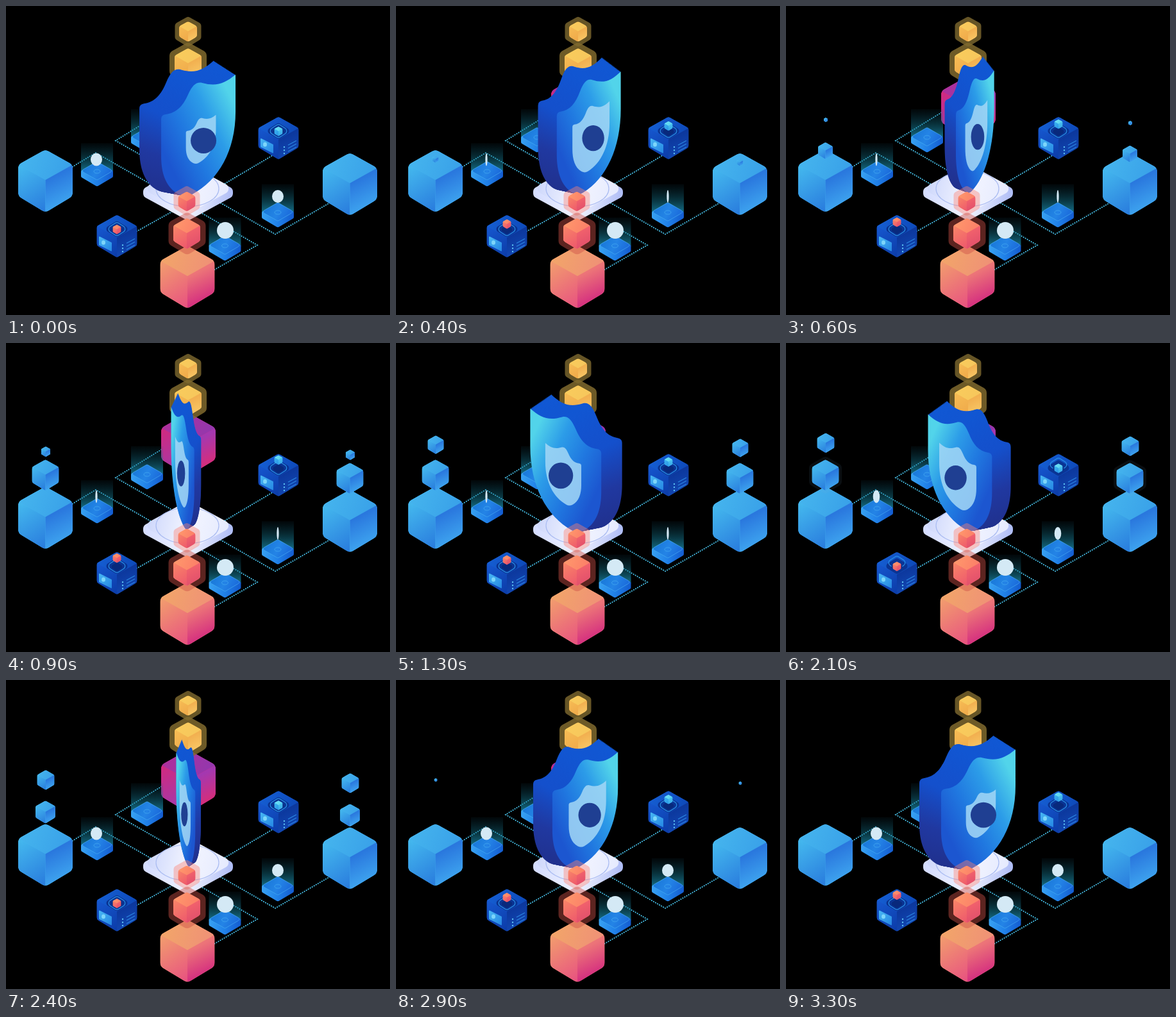
Recreate the animation shown at these times as an HTML page with a canvas. Size 599x482 px, loop 3400 ms.

```html
<!DOCTYPE html>
<html lang="en">
<head>
<meta charset="utf-8">
<title>Isometric shield</title>
<style>
html, body { margin: 0; width: 100%; height: 100%; overflow: hidden; background: #000; }
canvas { display: block; }
</style>
</head>
<body>
<canvas id="stage" width="599" height="482"></canvas>
<script>
const g = document.getElementById('stage').getContext('2d');
const LOOP = 3400, STEP = 100;
const { PI, sin, cos, abs, min, max, floor } = Math;

// Gradient pairs for the top, left and right side of a cube
const BLUE = [['#46b6ee', '#389fe8'], ['#44b8ee', '#2a7ede'], ['#2a78de', '#3fa6f0']];
const PINK = [['#f2a768', '#ef8f78'], ['#f29c6e', '#e8557f'], ['#ec7478', '#d32a80']];
const CORAL = [['#ff9a6c', '#fb7c68'], ['#f98468', '#ee5a6c'], ['#f0606c', '#e2506c']];
const PURPLE = [['#b0309a', '#9038b0'], ['#d02a80', '#9c3cb0'], ['#a438b0', '#dc2c74']];
const GOLD = [['#f9cc5c', '#f6c65c'], ['#f6bc54', '#efa94a'], ['#f2b050', '#f8c866']];
const CYAN = [['#6fe4f4', '#58d0f0'], ['#3cb4f0', '#2c98e8'], ['#48c0ee', '#36a8ea']];

// Progress from a to b as 0..1, and a half wave between them
const seg = (t, a, b) => max(0, min(1, (t - a) / (b - a)));
const bump = (t, a, b) => sin(PI * seg(t, a, b));

function ramp(x0, y0, x1, y1, ...colors) {
  const r = g.createLinearGradient(x0, y0, x1, y1);
  colors.forEach((c, i) => r.addColorStop(i / (colors.length - 1), c));
  return r;
}

// Closed polygon with rounded corners
function poly(pts, r = 0) {
  const n = pts.length, [ax, ay] = pts[n - 1], [bx, by] = pts[0];
  g.beginPath();
  g.moveTo((ax + bx) / 2, (ay + by) / 2);
  pts.forEach((p, i) => g.arcTo(...p, ...pts[(i + 1) % n], r));
  g.closePath();
}

function fillPoly(pts, color, r) {
  poly(pts, r);
  g.fillStyle = color;
  g.fill();
}

const hexagon = (x, y, w, tall = .58) => {
  const upper = y - (tall - .28) * w, lower = y + (tall - .3) * w;
  return [[x, y - tall * w], [x + w / 2, upper], [x + w / 2, lower],
    [x, y + tall * w], [x - w / 2, lower], [x - w / 2, upper]];
};

const rhombus = (x, y, w, h) => [[x, y - h], [x + w, y], [x, y + h], [x - w, y]];

// Rhombus with its lower edges pulled down by d
const slab = (x, y, w, h, d) =>
  [[x, y - h], [x + w, y], [x + w, y + d], [x, y + h + d], [x - w, y + d], [x - w, y]];

function cube(x, y, w, colors, round = .13, tall = .58) {
  if (w < 1) return;
  const outline = hexagon(x, y, w, tall), [top, ur, lr, bottom, ll, ul] = outline;
  const mid = [x, y - (tall - .56) * w], h = w / 2;
  g.save();
  poly(outline, w * round);
  g.clip();
  fillPoly(outline, colors[1][0]);
  fillPoly([top, ur, mid, ul], ramp(x - h, y - h, x + h, y - .2 * h, ...colors[0]));
  fillPoly([ul, mid, bottom, ll], ramp(x - h, y - .5 * h, x, y + h, ...colors[1]));
  fillPoly([mid, ur, lr, bottom], ramp(x, y, x + .5 * h, y + h, ...colors[2]));
  g.restore();
}

function halo(x, y, w, color) {
  fillPoly(hexagon(x, y, w), color, w * .15);
}

function disc(x, y, rx, ry, color) {
  g.beginPath();
  g.ellipse(x, y, rx, ry, 0, 0, 7);
  g.fillStyle = color;
  g.fill();
}

function ring(x, y, rx, ry, color) {
  g.beginPath();
  g.ellipse(x, y, rx, ry, 0, 0, 7);
  g.strokeStyle = color;
  g.stroke();
}

function line(...pts) {
  g.beginPath();
  pts.forEach(p => g.lineTo(...p));
  g.stroke();
}

function wires() {
  g.save();
  g.strokeStyle = '#48c2ea';
  g.lineWidth = 1.8;
  g.setLineDash([1.9, 1.6]);
  line([100, 253], [140, 229], [240, 286]);
  line([246, 164], [171, 210], [262, 262]);
  line([203, 352], [264, 318]);
  line([338, 279], [416, 233]);
  line([310, 293], [420, 356], [505, 307]);
  line([300, 320], [392, 373], [324, 412]);
  g.restore();
}

// Glowing tile with its light beam; y is the middle of the top face
function pod(x, y) {
  g.fillStyle = ramp(0, y - 43, 0, y + 2, 'rgba(16,90,115,.08)', 'rgba(20,120,145,.4)', 'rgba(28,150,185,.75)');
  g.fillRect(x - 25, y - 43, 50, 45);
  fillPoly(slab(x, y, 25, 14.5, 10), ramp(x - 25, 0, x + 25, 0, '#38a2f2', '#2080e8', '#145cd0'), 3);
  fillPoly(rhombus(x, y, 25, 14.5), ramp(x - 20, y - 10, x + 20, y + 10, '#1878d8', '#2484e6', '#1a68da'), 2.5);
  g.lineWidth = 1;
  poly(rhombus(x, y, 25, 14.5), 2.5);
  g.strokeStyle = 'rgba(80,185,245,.55)';
  g.stroke();
  ring(x, y + 1, 5, 3, 'rgba(80,185,245,.55)');
}

function server(x, y, colors, t) {
  const lift = 13 * bump(t % 2450, 0, 1800), frameLift = 9 * bump(t, 1300, 2300);
  cube(x, y, 63, [['#1660d4', '#0d48b8'], ['#1658d0', '#0c3ca8'], ['#0c379c', '#1248b4']], .09, .53);
  fillPoly(rhombus(x, y - 11, 21, 13), '#0a3494', 5);
  g.lineWidth = 1.2;
  g.strokeStyle = '#2a90e6';
  poly(rhombus(x, y - 11 - frameLift, 17, 11), 5);
  g.stroke();
  fillPoly(rhombus(x, y - 10, 11, 7), '#08297c', 3);
  cube(x, y - 10.5 - lift, 13, colors, .2);
  fillPoly([[x - 28, y], [x - 8, y + 10], [x - 8, y + 24], [x - 28, y + 14]],
    ramp(x - 28, y, x - 8, y + 22, '#48b8f4', '#2688e4'), 1);
  disc(x - 21, y + 10, 3, 3.5, '#7cd6fa');
  g.strokeStyle = '#2c86e0';
  for (let i = 0; i < 3; i++) {
    line([x + 15, y + 11 + i * 5], [x + 28, y + 4 + i * 5]);
    disc(x + 9, y + 14 + i * 5, 1.2, 1.2, '#5cc0f2');
  }
}

function platform() {
  fillPoly(slab(284, 285, 70, 38, 12), ramp(215, 0, 354, 0, '#d4dcff', '#f0f3ff', '#aebcf6'), 8);
  fillPoly(rhombus(284, 285, 72, 39), ramp(220, 270, 350, 300, '#ccd6fb', '#f3f5ff', '#e4e9fe'), 8);
  g.lineWidth = 1.2;
  ring(283, 285, 49, 28, '#aabcf2');
}

const FACE = new Path2D('M242 176Q242 170 249 169C266 167 276 156 284 138C291 123 297 118 306 120' +
  'C328 126 341 121 358 107L358 165C358 225 332 272 290 294Q281 299 270 294C250 284 242 262 242 235Z');

// Two eased half turns per loop; the width follows the cosine of the turn
function shield(t) {
  const half = (t + 60) / (LOOP / 2), u = half % 1;
  const turn = PI * (floor(half) + (1 - cos(PI * u)) / 2);
  const cx = 283 + 3.5 * sin(2 * turn);
  const top = 87 - 7.5 * sin(2 * PI * t / LOOP);
  const bottom = 297 - 6 * abs(sin(turn));
  g.save();
  g.translate(cx, top);
  g.scale(cos(turn), (bottom - top) / 210);
  g.translate(-283, -87);

  for (let k = 34; k > 0; k--) {
    g.save();
    g.translate(-k, -.9 * k);
    g.scale(1, 1 + .0024 * k);
    g.fillStyle = ramp(0, 105, 0, 300, '#1058d4', '#1450cc', '#2038a0', '#20308c');
    g.fill(FACE);
    g.restore();
  }
  g.fillStyle = ramp(244, 225, 362, 165, '#1c56d0', '#2078e0', '#2c9ce8', '#52d4ea');
  g.fill(FACE);

  const size = .4 * (1 + .45 * min(1, 2 * abs(sin(turn))));
  g.save();
  g.translate(304, 208);
  g.scale(size, size);
  g.translate(-300, -202);
  g.fillStyle = 'rgba(164,216,246,.85)';
  g.fill(FACE);
  g.restore();
  disc(308, 210, 20, 20, '#1f3f92');
  g.restore();
}

// Two small cubes grow out of a big one, then shrink in the air
function tower(x, y, t) {
  const low = 42 * seg(t, 245, 900) * seg(t, 2900, 2220);
  const high = 27 * seg(t, 370, 1370) * seg(t, 3000, 2450);
  const lowY = y - 21 - 46 * seg(t, 200, 900);
  const highY = y - 90 - 27 * seg(t, 400, 1400);
  cube(x, y, 85, BLUE);
  halo(x, lowY, 51, `rgba(120,170,205,${.14 * bump(t, 1300, 2300)})`);
  cube(x, lowY, low, BLUE);
  cube(x + .5, highY, high, BLUE);
}

function draw(t) {
  g.fillStyle = '#000';
  g.fillRect(0, 0, 599, 482);
  wires();
  cube(284.5, 158, 85, PURPLE);
  halo(284, 40, 41, '#665526');
  cube(284, 40, 28, GOLD, .25);
  halo(284, 90, 58, 'rgba(128,106,46,.85)');
  cube(284, 90, 42, GOLD);

  tower(61.5, 273, t);
  tower(536.5, 278, t);
  pod(142, 257);
  pod(220, 204);
  pod(424, 321);
  pod(341.5, 373);
  server(425, 206, CYAN, t);
  server(173, 359, CORAL, t);

  const narrow = seg(t, 0, 400) * seg(t, 2400, 1800);
  const rx = 9 * (1 - .82 * narrow);
  disc(141, 239.5, rx, 10, '#d4e9f5');
  disc(424, 297, rx, 10, '#d4e9f5');
  disc(342, 350, 13, 13, '#d4e9f5');

  platform();
  shield(t);
  halo(282, 304, 41, 'rgba(250,130,115,.42)');
  cube(282, 305, 27, CORAL, .2);
  cube(283, 423, 85, PINK);
  halo(282.5, 355, 58, 'rgba(205,80,72,.45)');
  cube(282, 355, 42, CORAL);
}

function frame(now) {
  draw(floor(now % LOOP / STEP) * STEP);
  requestAnimationFrame(frame);
}
requestAnimationFrame(frame);
</script>
</body>
</html>
```
